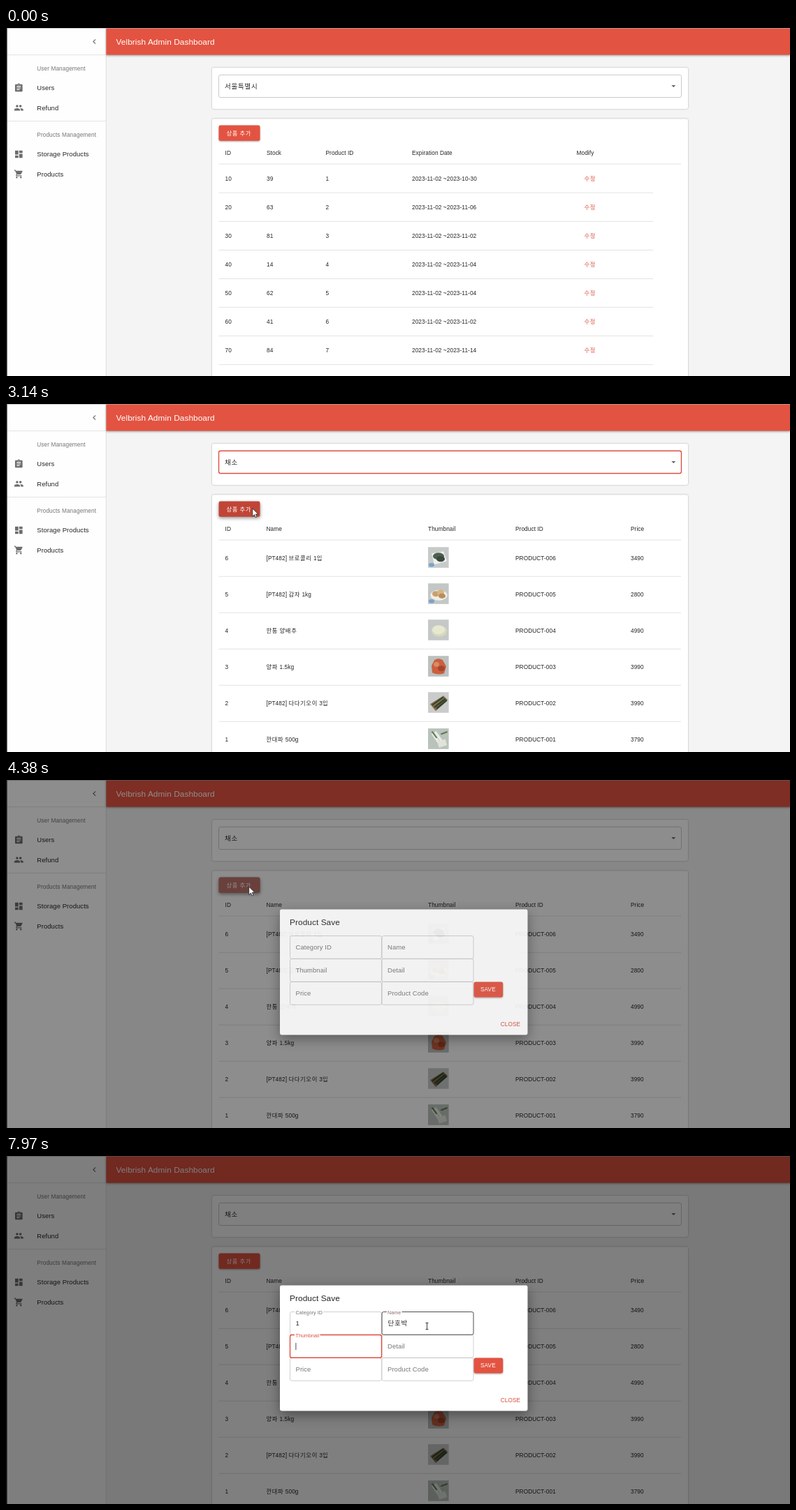
Animation of 1122 by 499 pixels, one loop 8000 ms. Source, as an HTML page:

```html
<!DOCTYPE html>
<html lang="ko">
<head>
<meta charset="utf-8">
<title>Admin Dashboard</title>
<style>
html,body{margin:0;width:100%;height:100%;overflow:hidden;background:#f4f4f4}
svg{display:block;width:100%;height:100%;font-family:"Liberation Sans",Arial,"Noto Sans CJK KR","Noto Sans CJK",sans-serif;font-size:8.27px;letter-spacing:.01em}
text{fill:#262626;white-space:pre}
.k{letter-spacing:.085em}
.b{font-size:9.46px}
.h{font-size:11.82px}
.m{text-anchor:middle}
.card{fill:#fff;filter:drop-shadow(0 .8px .8px rgba(0,0,0,.3))}
.btn{filter:drop-shadow(0 1px 1px rgba(0,0,0,.35))}
.btn.down{filter:drop-shadow(0 2.5px 2.5px rgba(0,0,0,.42))}
</style>
</head>
<body>
<svg id="stage" viewBox="0 0 1122 499" preserveAspectRatio="none"></svg>
<script>
const LOOP = 8000, RED = '#e35341', NEVER = 1e9;
const svg = document.getElementById('stage');
const $ = id => document.getElementById(id);

// ---------- drawing helpers ----------
const hangul = s => s.replace(/[\u3131-\uD7A3]+/g, r => `<tspan class="k">${r}</tspan>`);
const text = (x, y, s, cls = '', fill = '') =>
  `<text x="${x}" y="${y}" class="${cls}"${fill && ` style="fill:${fill}"`}>${hangul(s)}</text>`;
const rect = (x, y, w, h, fill, more = '') =>
  `<rect x="${x}" y="${y}" width="${w}" height="${h}" fill="${fill}" ${more}/>`;
const line = (x1, x2, y, c = '#e0e0e0') => rect(x1, y - .4, x2 - x1, .9, c);
const path = (d, fill, more = '') => `<path d="${d}" fill="${fill}" ${more}/>`;
const oval = (x, y, rx, ry, fill) => `<ellipse cx="${x}" cy="${y}" rx="${rx}" ry="${ry}" fill="${fill}"/>`;
const icon = (x, y, d, fill = '#6c6c6c') => path(d, fill, `transform="translate(${x} ${y}) scale(.591)"`);
const group = (id, body, more = '') => `<g id="${id}" ${more}>${body}</g>`;
const R = 'rx="2.4"';

// ---------- timing helpers ----------
const clamp = p => Math.max(0, Math.min(1, p));
function bezier(x1, x2, p) {
  p = clamp(p);
  let lo = 0, hi = 1, u = .5;
  for (let i = 0; i < 18; i++) {
    u = (lo + hi) / 2;
    const x = 3 * u * (1 - u) * (1 - u) * x1 + 3 * u * u * (1 - u) * x2 + u * u * u;
    if (x < p) lo = u; else hi = u;
  }
  return 3 * u * u * (1 - u) + u * u * u;
}
const inOut = (t, start, len) => bezier(.4, .2, (t - start) / len);
const out = (t, start, len) => bezier(0, .2, (t - start) / len);
const mix = (a, b, p) => `rgb(${a.map((v, i) => Math.round(v + (b[i] - v) * p))})`;
const show = (id, on) => { $(id).style.display = on ? '' : 'none'; };

// ---------- page parts ----------
const ICON = {
  task: 'M19 3h-4.18C14.4 1.84 13.3 1 12 1c-1.3 0-2.4.84-2.82 2H5c-1.1 0-2 .9-2 2v14c0 1.1.9 2 2 2h14c1.1 0 2-.9 2-2V5c0-1.1-.9-2-2-2zm-7 0c.55 0 1 .45 1 1s-.45 1-1 1-1-.45-1-1 .45-1 1-1zm2 14H7v-2h7v2zm3-4H7v-2h10v2zm0-4H7V7h10v2z',
  people: 'M16 11a3 3 0 1 0-3-3 3 3 0 0 0 3 3zm-8 0a3 3 0 1 0-3-3 3 3 0 0 0 3 3zm0 2c-2.33 0-7 1.17-7 3.5V19h14v-2.5c0-2.33-4.67-3.5-7-3.5zm8 0c-.29 0-.62.02-.97.05 1.16.84 1.97 1.97 1.97 3.45V19h6v-2.5c0-2.33-4.67-3.5-7-3.5z',
  board: 'M3 13h8V3H3v10zm0 8h8v-6H3v6zm10 0h8V11h-8v10zm0-18v6h8V3h-8z',
  cart: 'M7 18a2 2 0 1 0 2 2 2 2 0 0 0-2-2zM1 2v2h2l3.6 7.59-1.35 2.45C4.5 15.4 5.5 17 7 17h12v-2H7.42c-.2 0-.3-.2-.22-.37l.9-1.63h7.45c.75 0 1.41-.41 1.75-1.03l3.58-6.49A1 1 0 0 0 20 4H5.21l-.94-2zm16 16a2 2 0 1 0 2 2 2 2 0 0 0-2-2z',
  left: 'M15.41 7.41 14 6l-6 6 6 6 1.41-1.41L10.83 12z',
  right: 'M10 6 8.59 7.41 13.17 12l-4.58 4.59L10 18l6-6z'
};

function frame() {
  const item = (y, d, label) => icon(11.2, y - 7.1, d) + text(44.3, y + 3.3, label, 'b');
  return rect(0, 0, 1122, 499, '#f4f4f4') +
    rect(0, 0, 143, 499, '#fefefe') + rect(142.8, 0, .9, 499, '#dcdcdc') +
    rect(143.5, 0, 978.5, 38.5, RED, 'style="filter:drop-shadow(0 1.4px 1.6px rgba(0,0,0,.4))"') +
    rect(2, 0, 1120, .7, '#b9aeac') +
    text(157.5, 23.7, 'Velbrish Admin Dashboard', 'h', '#fff') +
    icon(119.4, 12.4, ICON.left) + line(2, 143, 38.5) +
    text(44.3, 61, 'User Management', '', '#777') +
    item(86, ICON.task, 'Users') + item(114.4, ICON.people, 'Refund') +
    line(2, 143, 133.5) +
    text(44.3, 156, 'Products Management', '', '#777') +
    item(181, ICON.board, 'Storage Products') + item(209.5, ICON.cart, 'Products') +
    rect(295, 57, 681, 59, '#fff', 'class="card" ' + R) +
    rect(295, 130.3, 681, 400, '#fff', 'class="card" ' + R);
}

const heads = list => list.map(([x, s]) => text(x, 181.5, s)).join('') + line(304.5, 966, 195);

function storagePage() {
  const stock = [39, 63, 81, 14, 62, 41, 84];
  const ends = ['10-30', '11-06', '11-02', '11-04', '11-04', '11-02', '11-14'];
  let s = heads([[313.5, 'ID'], [373, 'Stock'], [457.5, 'Product ID'], [581, 'Expiration Date'], [816.5, 'Modify']]);
  stock.forEach((n, i) => {
    const y = 218.5 + 41.07 * i;
    s += text(313.5, y, `${i + 1}0`) + text(373, y, `${n}`) + text(457.5, y, `${i + 1}`) +
      text(581, y, `2023-11-02 ~2023-${ends[i]}`) + text(827.5, y, '수정', '', '#dd5848') +
      line(304.5, 926, 236.2 + 41.07 * i);
  });
  return s + text(827.5, 506, '수정', '', '#dd5848');
}

function emptyPage() {
  const pages = ['1', '2', '3', '4', '5', '…', '10'];
  return heads([[313.5, 'ID'], [394.5, 'Name'], [516.5, 'Thumbnail'], [689, 'Product ID'], [863, 'Price']]) +
    rect(328.6, 195.4, 18.8, 18.8, '#ebebeb', R) +
    pages.map((p, i) => text(338 + 22.45 * i, 207.5, p, 'm')).join('') +
    icon(309, 197.7, ICON.left, '#b5b5b5') + icon(488, 197.7, ICON.right, '#222');
}

const badge = oval(5, 25.5, 4, 2.8, '#7ba3cb');
const strokes = (d, c, w) => `<path d="${d}" stroke="${c}" stroke-width="${w}" fill="none" stroke-linecap="round"/>`;
const THUMBS = [
  path('M5 9 22 6 27 20 9 25Z', '#eef0ef') + oval(15, 13, 8, 5, '#4c5f50') + oval(18, 17, 6, 4, '#39493d') + badge,
  oval(15.5, 17, 12, 7.5, '#f0eee6') + oval(11, 15, 5, 4, '#c9a06e') + oval(18, 13, 5, 4, '#d8b483') + oval(20, 18, 5, 3.6, '#b98c5c') + badge,
  oval(16, 16.5, 11, 8, '#d6d9bd') + oval(15, 14.5, 9, 6.5, '#e7e8d0'),
  path('M9 6Q15 2 21 6L26 15 23 25Q14 28 6 24L5 14Z', '#c9603f') + oval(12, 12, 4, 3.5, '#dd8a63') + oval(19, 18, 5, 4, '#a9442c'),
  path('M3 17 22 5 28 11 11 27Z', '#8a6848') + strokes('M7 18 21 8M10 21 24 10M13 23 26 12', '#33452c', 2.5) + strokes('M8 19 22 9', '#83946a', .8),
  strokes('M7 8 18 24M11 6 22 22', '#e9ece4', 3.6) + strokes('M6 5 12 13M19 8 27 5', '#5d7d50', 2) + rect(14, 17, 12, 9, '#dfe3da', 'transform="rotate(-18 20 21)"')
];
const TINTS = ['#c6cac8', '#c3c7c6', '#c5c8c6', '#bcc1bf', '#c9cccb', '#bac2bc'];
const GOODS = [['[PT482] 브로콜리 1입', 3490], ['[PT482] 감자 1kg', 2800], ['한통 양배추', 4990],
  ['양파 1.5kg', 3990], ['[PT482] 다다기오이 3입', 3990], ['깐대파 500g', 3790]];

function listPage() {
  let s = heads([[313.5, 'ID'], [372.5, 'Name'], [604, 'Thumbnail'], [729, 'Product ID'], [894, 'Price']]);
  let pics = '';
  GOODS.forEach(([name, price], i) => {
    const y = 224 + 52 * i;
    s += text(313.5, y, `${6 - i}`) + text(372.5, y, name) + text(729, y, `PRODUCT-00${6 - i}`) +
      text(894, y, `${price}`) + line(304.5, 966, 247.2 + 52 * i);
    pics += `<g transform="translate(604 ${205.2 + 52 * i})">${rect(0, 0, 29.6, 29.6, TINTS[i])}${THUMBS[i]}</g>`;
  });
  return s + group('pics', pics);
}

const PROMPT = '카테고리를 선택하세요.';
const MENU = [PROMPT, '채소', '과일·견과·쌀', '수산·해산·건어물', '정육·계란', '국·반찬·메인요리',
  '샐러드·간편식', '면·양념·오일', '생수·음료·우유·커피', '간식·과자·떡', '베이커리·치즈·델리'];
const ROW = 21.27;

function menu() {
  return rect(304.5, 99.5, 662, 243.7, '#fff', R + ' style="filter:drop-shadow(0 3px 4px rgba(0,0,0,.38))"') +
    rect(304.5, 104.2, 662, ROW, '#fdf6f5') +
    group('hoverRow', rect(304.5, 104.2 + ROW, 662, ROW, '#f4f4f4')) +
    '<circle id="menuRipple" cx="375" cy="136" clip-path="url(#rowClip)"/>' +
    MENU.map((s, i) => text(314, 118.1 + ROW * i, s, 'b', i ? '' : '#b9b4b3')).join('');
}

function dialog() {
  return rect(392, 185.5, 354.5, 180, '#fff', R + ' style="filter:drop-shadow(0 6px 9px rgba(0,0,0,.4))"') +
    text(406, 208.3, 'Product Save', 'h') +
    group('fields', '', 'clip-path="url(#formClip)"') +
    rect(669.6, 289.5, 41.6, 22, RED, 'class="btn" ' + R) +
    text(679, 303.3, 'SAVE', '', '#fff') + text(707.7, 352.5, 'CLOSE', '', '#d9503f');
}

const clip = (id, x, y, w, h) => `<clipPath id="${id}">${rect(x, y, w, h, '#000', R)}</clipPath>`;
svg.innerHTML = `<defs>${clip('rowClip', 304.5, 104.2 + ROW, 662, ROW)}${clip('btnClip', 304.5, 139.6, 59, 22.2)}
  ${clip('formClip', 392, 222, 354, 144)}</defs>` +
  frame() +
  group('storage', storagePage()) + group('empty', emptyPage()) + group('list', listPage()) +
  rect(304.5, 67.3, 662, 32.2, 'none', 'id="select" ' + R) +
  group('choice0', text(313, 86.8, '서울특별시', 'b')) + group('choice1', text(313, 86.8, PROMPT, 'b')) +
  group('choice2', text(313, 86.8, '채소', 'b')) +
  path('M-3-1.5H3L0 1.5Z', '#666', 'id="caretIcon"') +
  rect(304.5, 139.6, 59, 22.2, RED, 'id="add" class="btn" ' + R) +
  '<circle id="addRipple" cx="348" cy="153" fill="#fff" clip-path="url(#btnClip)"/>' +
  text(315.5, 153.6, '상품 추가', '', '#fff') +
  group('menu', menu()) +
  rect(0, 0, 1122, 499, '#000', 'id="shade"') +
  group('dialog', dialog()) +
  rect(0, 0, 1.6, 499, '#111') +
  group('cursor',
    path('M0 0V11.5L2.7 9 4.4 13 6.3 12.2 4.6 8.3H8.2Z', '#fff', 'id="arrow" stroke="#222" stroke-width=".8"') +
    path('M-1 1Q0-.6 1 1V6L5.5 7Q7 7.4 6.9 9L6 13V14.5H-.5V13.3L-4 8.9Q-4 7.4-2.6 8L-1 9.5Z', '#fff', 'id="hand" stroke="#222" stroke-width=".8"') +
    path('M-2-4.7H2M0-4.7V4.7M-2 4.7H2', 'none', 'id="beam" stroke="#222" stroke-width=".9"'));

// ---------- motion ----------
const PATH = [[130, 1006, 449], [890, 122, 236], [960, 122, 236], [1030, 96, 211], [1290, 96, 211],
  [1650, 382, 88], [1830, 382, 88], [2170, 375, 135], [2880, 375, 135], [3240, 347.7, 153],
  [4380, 347.7, 153], [4800, 481.5, 238], [5350, 481.5, 238], [5800, 602.5, 244],
  [6050, 602.5, 244], [6330, 702, 377], [6400, 702, 377], [6700, 602.5, 244], [LOOP, 602.5, 244]];

function pointer(t) {
  const i = Math.max(1, PATH.findIndex(k => k[0] > t));
  const [t0, x0, y0] = PATH[i - 1], [t1, x1, y1] = PATH[i];
  const p = clamp((t - t0) / (t1 - t0)), e = p * p * (3 - 2 * p);
  return [x0 + (x1 - x0) * e, y0 + (y1 - y0) * e];
}

// label, focus time, blur time, colour fade after blur
const FIELDS = [['Category ID', 4800, 5900, 200], ['Name', 5900, 7790, 360], ['Thumbnail', 7790, NEVER, 200],
  ['Detail', NEVER], ['Price', NEVER], ['Product Code', NEVER]];
const TYPED = [[6830, 'ㄷ'], [6960, '다'], [7090, '단'], [7240, '닪'], [7330, '단호'], [7420, '단홉'], [7510, '단호박']];

const GREY = [119, 119, 119], ACCENT = [221, 80, 64];
const caret = (x, y, t, since) => Math.floor((t - since) / 500) % 2 ? '' : rect(x, y + 11.5, .8, 10, '#222');

function drawFields(t, mx, my) {
  let back = '', front = '';
  FIELDS.forEach(([label, on, off, fade], i) => {
    const x = 406.5 + 131.5 * (i % 2), y = 223.5 + 33 * (i >> 1);
    const focus = t >= on && t < off, p = out(t, on, 200);
    const over = mx > x && mx < x + 131 && my > y && my < y + 33;
    const red = focus ? p : t >= off ? 1 - inOut(t, off, fade) : 0;
    const edge = focus ? '#dd5040' : over ? '#222' : '#c6c6c6';
    let s = rect(x, y, 131, 32.8, 'none', `${R} stroke="${edge}" stroke-width="${focus ? 1.4 : .8}"`);
    s += `<g transform="translate(${x + 8} ${y + 19.4 - 16.3 * p}) scale(${1 - .25 * p})">` +
      `<text class="b" style="fill:${mix(GREY, ACCENT, red)};paint-order:stroke;stroke:#fff;stroke-width:${5 * p}">${label}</text></g>`;
    if (i === 0) {
      const typed = t >= 5270;
      if (typed) s += text(x + 8, y + 19.9, '1', 'b');
      if (focus) {
        s += caret(x + (typed ? 13.6 : 8), y, t, typed ? 5270 : on) +
          rect(x + 114.5, y + 10.5, 8.5, 12, '#efefef') +
          path(`M${x + 116.4} ${y + 15}h4.6l-2.3-2.8zM${x + 116.4} ${y + 18.4}h4.6l-2.3 2.8z`, '#444');
      }
    } else if (i === 1) {
      const key = TYPED.filter(k => k[0] <= t).pop();
      if (key) s += text(x + 8.5, y + 19.9, key[1], 'b');
      else if (focus) s += caret(x + 8.5, y, t, on);
    } else if (focus) s += caret(x + 8, y, t, on);
    if (focus || over) front += s; else back += s;
  });
  $('fields').innerHTML = back + front;
}

function render(t) {
  const [mx, my] = pointer(t);
  const listed = t >= 2850, opened = t >= 4240;

  show('storage', t < 1170);
  show('empty', t >= 1170 && !listed);
  show('list', listed);
  show('pics', t >= 2950);
  show('choice0', t < 1170);
  show('choice1', t >= 1170 && t < 2660);
  show('choice2', t >= 2660);

  // category select and its menu
  const focus = t >= 1690 && t < 3350, menuOn = t >= 1770 && t < 2850;
  const overSelect = mx > 304 && mx < 967 && my > 67 && my < 100 && !opened && !menuOn;
  $('select').setAttribute('stroke', focus ? '#dd5040' : overSelect ? '#222' : '#c4c4c4');
  $('select').setAttribute('stroke-width', focus ? 1.4 : .9);
  $('caretIcon').setAttribute('transform', `translate(955.3 83.4) scale(1 ${t >= 1770 && t < 2660 ? -1 : 1})`);
  show('menu', menuOn);
  const grow = inOut(t, 1770, 250) * (1 - inOut(t, 2660, 190)), k = .75 + .25 * grow;
  $('menu').setAttribute('opacity', grow);
  $('menu').setAttribute('transform', `translate(635.5 99.5) scale(${k} ${k * k}) translate(-635.5 -99.5)`);
  show('hoverRow', my > 104.2 + ROW);
  const wave = inOut(t, 2508, 550);
  $('menuRipple').setAttribute('r', 591 * wave);
  $('menuRipple').setAttribute('opacity', (.1 + .2 * wave) * .87);

  // add button
  const hover = inOut(t, 3050, 250) * (1 - inOut(t, 4400, 250));
  const press = inOut(t, 3350, 550);
  $('add').setAttribute('fill', mix([227, 83, 65], [162, 56, 46], hover));
  $('add').classList.toggle('down', t >= 3050 && t < 4450);
  $('addRipple').setAttribute('r', 48 * press);
  $('addRipple').setAttribute('opacity', (.1 + .2 * press) * (1 - inOut(t, 4350, 400)));

  // dialog
  const fade = inOut(t, 4240, 225);
  show('shade', opened);
  show('dialog', opened);
  $('shade').setAttribute('opacity', .5 * fade);
  $('dialog').setAttribute('opacity', fade);
  if (opened) drawFields(t, mx, my);

  // mouse pointer
  show('cursor', t >= 130);
  $('cursor').setAttribute('transform', `translate(${mx} ${my})`);
  const beam = t > 4400 && mx > 406 && mx < 670 && my > 223 && my < 323;
  const hand = !beam && !opened && (menuOn || overSelect || (mx < 120 && my > 195));
  show('beam', beam);
  show('hand', hand);
  show('arrow', !beam && !hand);
}

const begin = performance.now();
function tick() {
  render((performance.now() - begin) % LOOP);
  requestAnimationFrame(tick);
}
tick();
</script>
</body>
</html>
```
